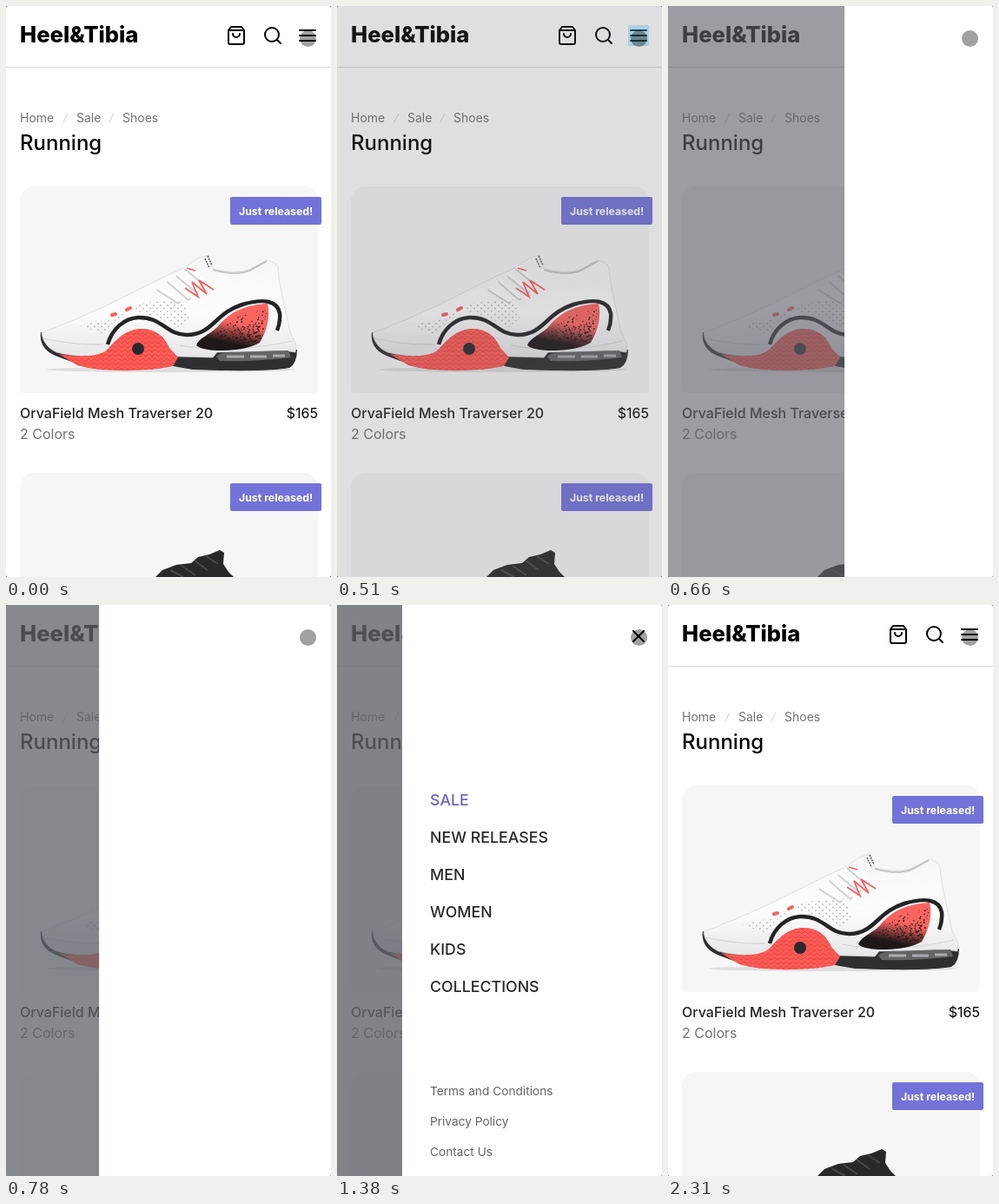
Recreate the animation shown at these times as an HTML page. Size 374 by 658 pixels, loop 2400 ms.

```html
<!DOCTYPE html>
<html lang="en">
<head>
<meta charset="utf-8">
<title>Shoe store menu</title>
<style>
  html, body { margin: 0; width: 100%; height: 100%; overflow: hidden; background: #555; }
  svg { display: block; width: 374px; height: 658px; border-radius: 2px; background: #fff; }
  text { font-family: Inter, "Open Sans", sans-serif; font-size: 16px; }
  .logo { font-size: 25.6px; font-weight: 800; }
  .crumbs text { font-size: 14px; fill: #727272; }
  .title { font-size: 24px; font-weight: 500; }
  .name { font-weight: 500; fill: #222; }
  .muted { fill: #727272; }
  .badge { font-size: 12.3px; font-weight: 700; fill: #fff; }
  .nav text { font-size: 17.8px; font-weight: 500; fill: #28282b; }
  .nav .sale { fill: #6a65c0; }
  .legal text { font-size: 13.7px; fill: #646468; }
  .icon { fill: none; stroke: #000; stroke-width: 2; stroke-linecap: round; stroke-linejoin: round; }

  .overlay, .drawer, .content, .tap { animation: 2400ms linear infinite both; }
  .overlay { animation-name: dim; }
  .drawer { animation-name: slide; }
  .content { animation-name: reveal; }
  .tap-open { animation-name: tapOpen; }
  .tap-close { animation-name: tapClose; }

  @keyframes dim {
    0% { opacity: 0; }
    17.5% { opacity: 0; animation-timing-function: ease; }
    38.33%, 71.25% { opacity: 1; }
    71.26%, 100% { opacity: 0; }
  }
  @keyframes slide {
    0% { transform: translateX(300px); }
    25.46% { transform: translateX(300px); animation-timing-function: cubic-bezier(0, .6, .32, 1.06); }
    42.13%, 71.25% { transform: translateX(0); }
    71.26%, 100% { transform: translateX(300px); }
  }
  @keyframes reveal {
    0% { opacity: 0; }
    33.12% { opacity: 0; animation-timing-function: ease; }
    58.12%, 100% { opacity: 1; }
  }
  @keyframes tapOpen {
    0%, 16.24% { opacity: 0; }
    16.25%, 27% { opacity: .32; }
    27.01%, 100% { opacity: 0; }
  }
  @keyframes tapClose {
    0%, 69.98% { opacity: 0; }
    69.99%, 71.25% { opacity: .32; }
    71.26%, 100% { opacity: 0; }
  }
</style>
</head>
<body>
<svg viewBox="0 0 374 658">
  <defs>
    <pattern id="holes" width="8" height="7" patternUnits="userSpaceOnUse">
      <circle cx="2" cy="2" r=".9" fill="#b4b4b7"/>
      <circle cx="6" cy="5.5" r=".9" fill="#b4b4b7"/>
    </pattern>
    <pattern id="tread" width="7" height="5" patternUnits="userSpaceOnUse">
      <path d="M0 4 3.5 1 7 4" fill="none" stroke="#d93f3b" stroke-width=".9"/>
    </pattern>
    <linearGradient id="upper" x1="0" y1="0" x2="0" y2="1">
      <stop offset="0" stop-color="#f6f6f7"/>
      <stop offset=".55" stop-color="#fdfdfd"/>
      <stop offset="1" stop-color="#e6e6e9"/>
    </linearGradient>
    <linearGradient id="heel" x1=".75" y1="0" x2=".45" y2="1">
      <stop offset=".45" stop-color="#fa6460"/>
      <stop offset=".85" stop-color="#1d1718"/>
    </linearGradient>
    <path id="card" d="M16 224a16 16 0 0 1 16-16H343a16 16 0 0 1 16 16V442a4 4 0 0 1-4 4H20a4 4 0 0 1-4-4Z" fill="#f6f6f6"/>
    <path id="forefoot" d="M61 401C84 405 104 404 114 398 124 390 132 374 154 372 174 371 184 384 188 394L198 405 192 415C166 421 112 423 82 414Z"/>
    <g id="flag">
      <rect x="258" y="220" width="105" height="32" rx="2" fill="#7272d9"/>
      <text class="badge" x="268" y="240.5">Just released!</text>
    </g>
  </defs>

  <g id="page">
    <text class="logo" x="16" y="42">Heel&amp;Tibia</text>
    <path d="M0 70.5H374" stroke="#dcdcde"/>
    <g class="icon">
      <path transform="translate(253 22)" d="M6 2 3 6v14a2 2 0 0 0 2 2h14a2 2 0 0 0 2-2V6l-3-4ZM3 6H21M16 10a4 4 0 0 1-8 0"/>
      <path transform="translate(295 22)" d="M19 11A8 8 0 1 1 3 11a8 8 0 0 1 16 0ZM21 21 16.7 16.7"/>
      <path transform="translate(335 22)" d="M3 6H21M3 12H21M3 18H21"/>
    </g>

    <g class="crumbs">
      <text x="16" y="134">Home</text>
      <text x="81" y="134">Sale</text>
      <text x="134" y="134">Shoes</text>
      <path d="M65.5 134.5 71 124M118.5 134.5 124 124" stroke="#d0d0d0"/>
    </g>
    <text class="title" x="16" y="166">Running</text>

    <use href="#card"/>
    <g id="lightShoe">
      <ellipse cx="190" cy="419" rx="144" ry="3" fill="#dededf"/>
      <!-- outsole, upper and midsole -->
      <path d="M40 376C38 390 46 400 62 405L92 416Q130 423 192 415L215 419Q300 422 326 417 335 412 335 396L190 400Z" fill="#2f2f31"/>
      <path d="M41 377C45 373 52 374 62 368L78 362 114 346 148 329 182 312 202 303 222 290 233 287 238 303Q262 309 280 304L300 293Q310 295 313 301 314 318 319 340L327 376 334 390 333 399Q318 396 290 398L243 399 238 405 200 404 114 402Q84 406 58 399 43 392 41 377Z" fill="url(#upper)" stroke="#d5d5d8" stroke-width=".7"/>
      <path d="M42 383Q80 391 112 390M200 391Q260 402 329 386" fill="none" stroke="#d2d2d6" stroke-width="1.2"/>
      <path d="M84 368 124 360 158 342 204 338 212 364 198 370 172 358 144 350 124 364 112 378Z" fill="url(#holes)"/>
      <!-- forefoot -->
      <use href="#forefoot" fill="#ff5b56"/>
      <use href="#forefoot" fill="url(#tread)"/>
      <circle cx="152" cy="395" r="7" fill="#29292b"/>
      <!-- heel patch, stripe and air unit -->
      <path d="M219 391C222 382 236 378 244 369 256 354 274 344 301 343Q306 364 292 388C274 399 228 400 219 391Z" fill="url(#heel)"/>
      <path id="specks" fill="#241a1b"/>
      <path d="M117 390C122 372 136 360 152 359 180 358 184 379 208 379 238 379 240 354 272 344 296 337 312 339 315 354Q316 364 312 374" fill="none" stroke="#242427" stroke-width="4.5"/>
      <path d="M242 404Q248 398 264 399L325 397 328 405Q290 410 246 409Z" fill="#656568"/>
      <path d="M254 404H274M281 404H300M307 403H321" stroke="#aaaab0" stroke-width="3"/>
      <!-- laces and collar -->
      <path d="M176 327 198 341M188 318 210 337M198 311 220 329M208 303 226 318" stroke="#d3d3d7" stroke-width="5" stroke-linecap="round"/>
      <path d="M176 325 198 339M188 316 210 335M198 309 220 327M208 301 226 316" stroke="#fff" stroke-width="4" stroke-linecap="round"/>
      <path d="M206 325 221 335 214 318 231 332 222 316 239 327M208 302 218 305" fill="none" stroke="#f7625e" stroke-width="1.8"/>
      <path d="M122 356 126 355M139 350 143 348" stroke="#f7625e" stroke-width="4" stroke-linecap="round"/>
      <path d="M229 291 234 302M232 288 237 299" stroke="#555" stroke-width="1.5" stroke-dasharray="2 1"/>
      <path d="M238 304Q264 311 280 305L300 294" fill="none" stroke="#c4c4c8" stroke-width="2"/>
    </g>
    <use href="#flag"/>
    <text class="name" x="16" y="475">OrvaField Mesh Traverser 20</text>
    <text x="359" y="475" text-anchor="end">$165</text>
    <text class="muted" x="16" y="499">2 Colors</text>

    <use href="#card" y="330"/>
    <path d="M172 658 180 650 196 644 213 642 221 635 234 632 246 627 251 630 250 643 256 652 262 658Z" fill="#28282a"/>
    <path d="M189 650 204 658M202 645 218 656M217 639 232 650M230 634 244 643" stroke="#48484b" stroke-width="2"/>
    <use href="#flag" y="330"/>
  </g>

  <rect class="overlay" width="374" height="658" fill="rgb(97 100 107 / .8)"/>
  <rect class="tap tap-open" x="335" y="22" width="24" height="24" fill="#33b5e5"/>

  <g class="drawer">
    <rect x="75" width="340" height="658" fill="#fff"/>
    <g class="content">
      <path class="icon" d="M341 30 353 42M353 30 341 42"/>
      <g class="nav">
        <text class="sale" x="107" y="231">SALE</text>
        <text x="107" y="274">NEW RELEASES</text>
        <text x="107" y="317">MEN</text>
        <text x="107" y="360">WOMEN</text>
        <text x="107" y="403">KIDS</text>
        <text x="107" y="446">COLLECTIONS</text>
      </g>
      <g class="legal">
        <text x="107" y="565">Terms and Conditions</text>
        <text x="107" y="600">Privacy Policy</text>
        <text x="107" y="635">Contact Us</text>
      </g>
    </g>
  </g>
  <rect class="tap tap-close" x="335" y="24" width="24" height="24" fill="#33b5e5"/>
  <circle cx="347.5" cy="37.5" r="9.5" fill="#000" opacity=".37"/>
</svg>
<script>
  // Paint spatter on the heel, denser towards the sole.
  let seed = 7;
  const random = () => (seed = seed * 16807 % 2147483647) / 2147483647;
  let specks = '';
  for (let i = 0; i < 220; i++) {
    const depth = Math.sqrt(random());
    const left = 272 - 42 * depth;
    const x = left + random() * (300 - 8 * depth - left);
    const y = 350 + 38 * depth;
    const size = .6 + random() * 1.1;
    specks += `M${x.toFixed(1)} ${y.toFixed(1)}h${size}v${size}h${-size}z`;
  }
  document.getElementById('specks').setAttribute('d', specks);
</script>
</body>
</html>
```
